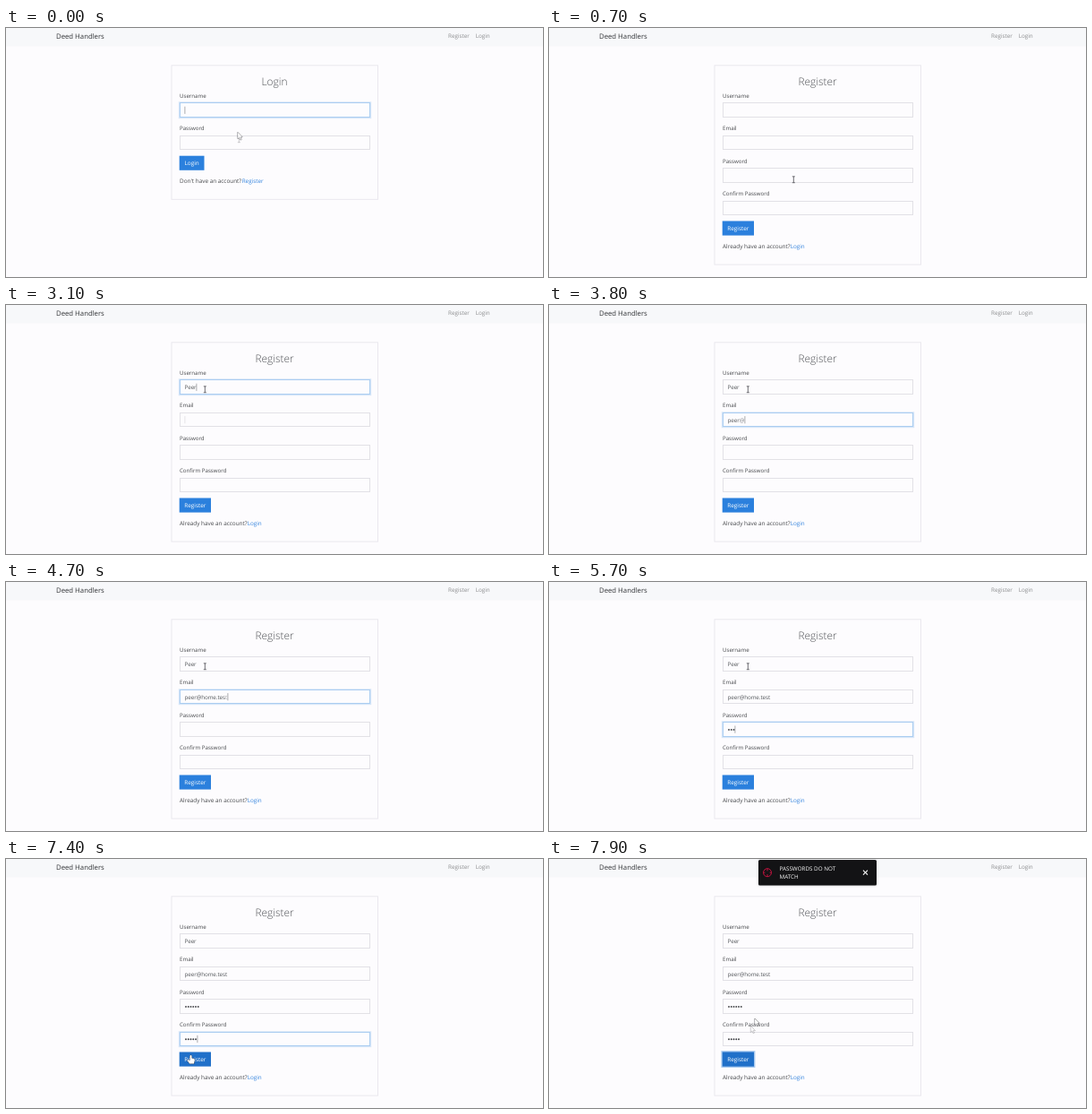
Animation, 600 px wide and 278 px high, one loop 8 s. Source, as an HTML page with a canvas:

```html
<!DOCTYPE html>
<html lang="en">
<head>
<meta charset="utf-8">
<title>Registration form</title>
<style>
  html, body { margin: 0; width: 100%; height: 100%; overflow: hidden; background: #fdfcfe; }
  canvas { display: block; width: 600px; height: 278px; }
</style>
</head>
<body>
<canvas id="stage"></canvas>
<script>
const LOOP = 8000, STEP = 100;
const PAGE_SWITCH = 700, SUBMIT = 7600;
const LABEL_SIZE = 6.15, BODY_SIZE = 6.4, ROW = 36.4;
const INK = '#46484b', LINK = '#3484de';

const canvas = document.getElementById('stage');
const ratio = window.devicePixelRatio || 1;
canvas.width = 600 * ratio;
canvas.height = 278 * ratio;
const ctx = canvas.getContext('2d');
ctx.scale(ratio, ratio);

// Key times are the moments at which each character appears.
const fields = [
  { label: 'Username', value: 'Peer', keys: [2000, 2150, 2250, 2400], focus: [1200, 3150] },
  { label: 'Email', value: 'peer@home.test', focus: [3150, 4900],
    keys: [3300, 3420, 3540, 3660, 3780, ...Array.from({ length: 9 }, (_, i) => 4100 + 75 * i)] },
  { label: 'Password', secret: true, keys: [5400, 5520, 5640, 5800, 5900, 6000], focus: [4900, 6200] },
  { label: 'Confirm Password', secret: true, keys: [6400, 6500, 6600, 6700, 6800], focus: [6200, SUBMIT] }
];
const loginFields = [
  { label: 'Username', value: '', keys: [], focus: [0, PAGE_SWITCH] },
  { label: 'Password', value: '', keys: [], focus: [-1, -1] }
];
const caretHidden = [[1750, 2000], [2650, 2850], [6900, 7100]];

// Pointer stops: time, x, y
const pointerPath = [
  [-40, 260, 124], [0, 259, 116.5], [300, 273, 169], [800, 273, 169], [1200, 222, 94],
  [7100, 222, 94], [7350, 206.5, 219], [7700, 206.5, 219], [7900, 230, 178], [8000, 231, 176]
];

const clamp = v => Math.max(0, Math.min(1, v));
const fadeIn = (t, at) => clamp((t - at + 50) / 100);
const within = (t, [from, to]) => t >= from && t < to;
const snap = v => Math.floor(v) + 0.5;

function withAlpha(alpha, draw) {
  if (alpha <= 0) return;
  ctx.save();
  ctx.globalAlpha *= alpha;
  draw();
  ctx.restore();
}

function text(str, x, y, color = INK, size = BODY_SIZE, align = 'left', weight = 400) {
  ctx.font = `${weight} ${size}px "Open Sans", "Noto Sans", sans-serif`;
  ctx.textRendering = 'geometricPrecision';
  ctx.textAlign = align;
  ctx.fillStyle = color;
  ctx.fillText(str, x, y);
}

function box(x, y, w, h, color) {
  ctx.fillStyle = color;
  ctx.fillRect(x, y, w, h);
}

function outline(x, y, w, h, color, width = 1) {
  ctx.strokeStyle = color;
  ctx.lineWidth = width;
  ctx.strokeRect(x, y, w, h);
}

function strokeLines(color, width, ...lines) {
  ctx.strokeStyle = color;
  ctx.lineWidth = width;
  ctx.beginPath();
  for (const [x1, y1, x2, y2] of lines) {
    ctx.moveTo(x1, y1);
    ctx.lineTo(x2, y2);
  }
  ctx.stroke();
}

function disc(x, y, r, color) {
  ctx.fillStyle = color;
  ctx.beginPath();
  ctx.arc(x, y, r, 0, 7);
  ctx.fill();
}

function drawValue(field, baseline, t) {
  let x = 199.5;
  field.keys.forEach((at, i) => {
    const alpha = fadeIn(t, at);
    if (!alpha) return;
    if (field.secret) {
      withAlpha(alpha, () => disc(x + 1.5, baseline - 2, 0.95, '#3d3f42'));
      x += 2.75;
    } else {
      withAlpha(alpha, () => text(field.value[i], x, baseline, '#55595c', 6.3));
      x += ctx.measureText(field.value[i]).width;
    }
  });
  return x;
}

function drawField(field, i, t) {
  const top = 83.9 + ROW * i, y = snap(top), h = snap(top + 15.4) - y;
  const focused = within(t, field.focus);
  text(field.label, 194, 77.7 + ROW * i, INK, LABEL_SIZE);
  if (focused) outline(194, y, 213, h + 0.5, '#d6e6f8', 2.4);
  box(194.5, y, 212, h, '#fdfcfe');
  outline(194.5, y, 212, h, focused ? '#abcdf1' : '#e2e1e6');

  const caretX = drawValue(field, top + 10.2, t);
  const caretAlpha = focused ? 0.6 : t < field.focus[1] ? 0.35 * fadeIn(t, field.focus[0] - 50) : 0;
  if (!caretHidden.some(span => within(t, span)))
    withAlpha(caretAlpha, () => box(snap(caretX), top + 3.8, 0.8, 8.2, '#56585b'));
}

function drawButton(label, y, w, hover, focused) {
  if (focused) outline(193.5, y - 0.5, w + 1, 16.5, '#a5c8ef', 2.2);
  box(193.7, y - 0.3, w + 0.5, 16.1, hover ? '#2070c9' : '#2b80dd');
  text(label, 194 + w / 2, y + 10.3, '#fff', BODY_SIZE, 'center');
}

function drawPage(t, p) {
  box(0, 0, 600, 278, '#fdfcfe');
  box(0, 0, 600, 20.5, '#f7f8fa');
  text('Deed Handlers', 56, 11.7, '#303235', 7.75);
  text('Register', 494, 11.4, '#8b8c8e', 6.3);
  text('Login', 524.7, 11.4, '#8b8c8e', 6.3);

  const login = t < PAGE_SWITCH;
  const title = login ? 'Login' : 'Register';
  const buttonY = login ? 143 : 215.8;
  outline(185, 41.8, 230.5, login ? 149.5 : 222.3, '#eae8ee');
  text(title, 300, 64.2, '#505256', 11.9, 'center', 300);
  (login ? loginFields : fields).forEach((field, i) => drawField(field, i, t));

  const width = login ? 27.3 : 34.8;
  const submitted = t >= SUBMIT;
  drawButton(title, buttonY, width, submitted || overButton(t, p), submitted);
  text(login ? "Don't have an account?" : 'Already have an account?', 194, buttonY + 30.2);
  text(login ? 'Register' : 'Login', login ? 263.7 : 269.7, buttonY + 30.2, LINK, 6.3);
}

function drawToast(t) {
  withAlpha(clamp((t - 7600) / 200), () => {
    ctx.save();
    ctx.shadowColor = 'rgba(0,0,0,.2)';
    ctx.shadowBlur = 3;
    ctx.fillStyle = '#131315';
    ctx.beginPath();
    ctx.roundRect(234, 1, 132, 28.4, 1.5);
    ctx.fill();
    ctx.restore();

    const red = '#c3123f', x = 244, y = 15.2;
    ctx.strokeStyle = red;
    ctx.lineWidth = 1;
    ctx.beginPath();
    ctx.arc(x, y, 4.5, 0, 7);
    ctx.stroke();
    strokeLines(red, 0.9, [x, y - 4.5, x, y - 1.8], [x, y + 1.8, x, y + 4.5],
      [x - 4.5, y, x - 2.6, y], [x + 2.6, y, x + 4.5, y]);

    text('PASSWORDS DO NOT', 257.5, 12.6, '#fff', 6.3);
    text('MATCH', 257.5, 22.4, '#fff', 6.3);
    strokeLines('#fff', 1.1, [351, 12.7, 356, 17.7], [356, 12.7, 351, 17.7]);
  });
}

function pointerAt(t) {
  const next = Math.max(1, pointerPath.findIndex(([time]) => time >= t));
  const [t0, x0, y0] = pointerPath[next - 1], [t1, x1, y1] = pointerPath[next];
  const k = clamp((t - t0) / (t1 - t0));
  return { x: x0 + (x1 - x0) * k, y: y0 + (y1 - y0) * k };
}

const overButton = (t, { x, y }) => t >= PAGE_SWITCH && x > 194 && x < 229 && y > 215.8 && y < 231.4;

function pointerShape(t, p) {
  const overLink = t < PAGE_SWITCH && p.x > 264 && p.x < 287 && p.y > 166 && p.y < 175;
  if (overLink || overButton(t, p)) return 'hand';
  const rows = t < PAGE_SWITCH ? 2 : 4;
  const row = Math.floor((p.y - 83.9) / ROW);
  const overInput = row >= 0 && row < rows && p.y - 83.9 - row * ROW < 15.4;
  return overInput ? 'beam' : 'arrow';
}

const shapes = {
  arrow: new Path2D('M0 0V7.2L1.7 5.7 2.9 8.5 4.1 8 2.9 5.3H5.1Z'),
  hand: new Path2D('M-1 .8Q0-.8 1 .8V3.4L3.8 4.3Q4.5 4.6 4.3 6L3.4 9.6H-1.4L-3.8 5.9Q-3.2 4.4-1 6Z')
};

function drawPointer(t, p) {
  const shape = pointerShape(t, p);
  ctx.save();
  ctx.translate(p.x, p.y);
  if (shape === 'beam') {
    strokeLines('#4a4a50', 0.8, [0.3, -3, 0.3, 3.5], [-1.2, -3.2, 1.8, -3.2], [-1.2, 3.7, 1.8, 3.7]);
  } else {
    ctx.strokeStyle = '#34343a';
    ctx.lineWidth = 0.8;
    ctx.lineJoin = 'round';
    ctx.stroke(shapes[shape]);
    ctx.fillStyle = '#fff';
    ctx.fill(shapes[shape]);
  }
  ctx.restore();
}

function render(t) {
  const p = pointerAt(t), trail = pointerAt(t - 40);
  const moving = Math.hypot(p.x - trail.x, p.y - trail.y) > 1;
  drawPage(t, p);
  drawToast(t);
  if (moving) withAlpha(0.35, () => drawPointer(t, trail));
  withAlpha(moving ? 0.8 : 1, () => drawPointer(t, p));
}

const start = performance.now();
function tick() {
  const elapsed = (performance.now() - start) % LOOP;
  render(Math.floor(elapsed / STEP) * STEP);
  requestAnimationFrame(tick);
}
tick();
</script>
</body>
</html>
```
